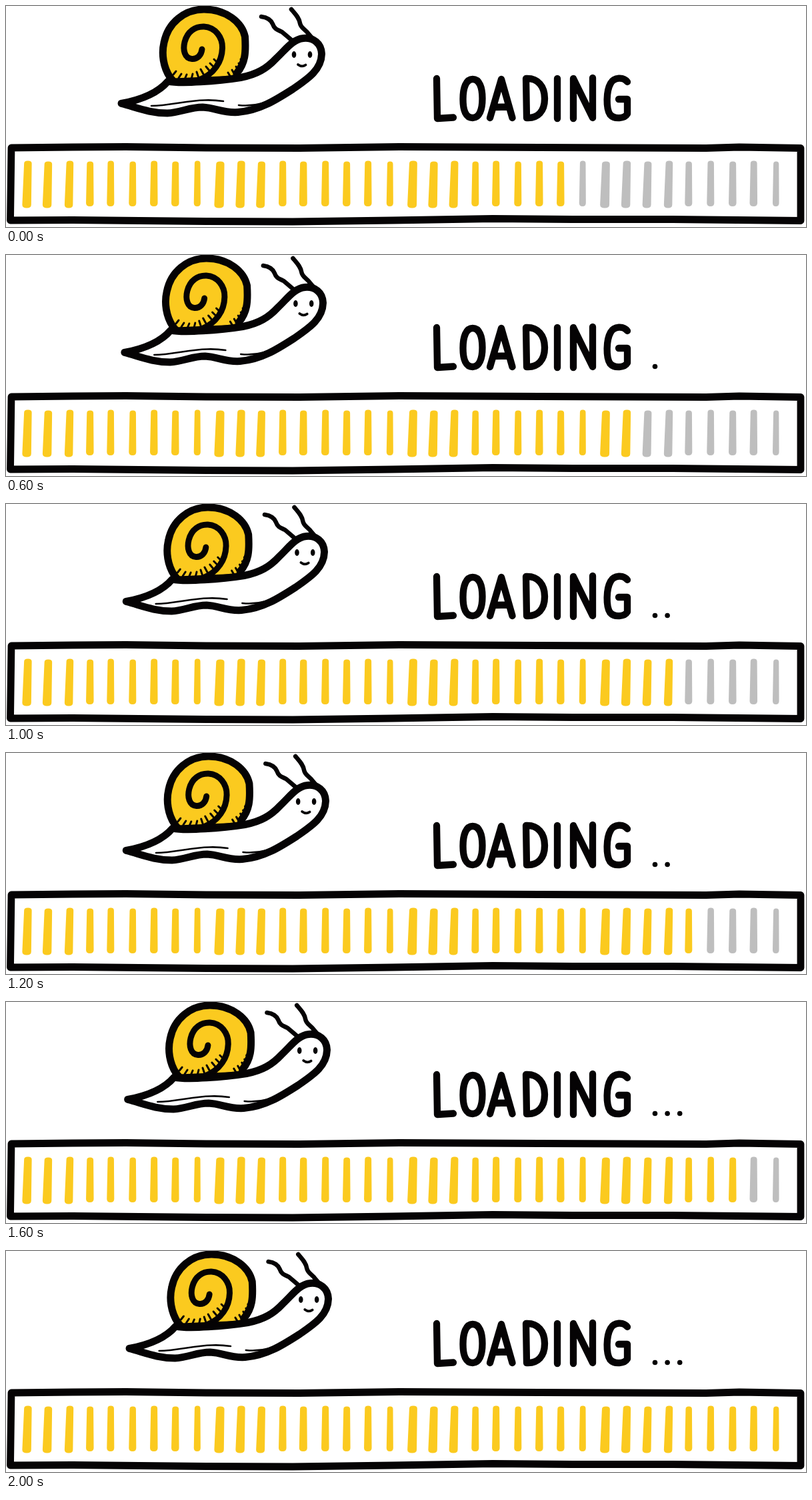
An HTML page with a canvas that plays this animation: 1200 px wide and 332 px high, repeating every 2200 ms.

```html
<!DOCTYPE html>
<html lang="en">
<head>
<meta charset="utf-8">
<title>Loading</title>
<style>
html, body { margin: 0; width: 100%; height: 100%; overflow: hidden; background: #fff; }
canvas { display: block; width: 1200px; height: 332px; }
</style>
</head>
<body>
<canvas id="stage" width="1200" height="332" role="img" aria-label="Loading"></canvas>
<script>
const ctx = document.getElementById('stage').getContext('2d');
const INK = '#050304', YELLOW = '#fbca1f', GREY = '#bebebe';
const STEP = 200, STEPS = 11;
const TAIL = 167, HEAD = 478;

const barX = [32, 62.5, 95, 126, 157, 190, 222, 254, 287, 320.5, 352, 382.5,
  415, 446, 479, 511, 543, 576, 610, 641, 672, 704, 735, 768,
  800, 832, 865, 899, 930.5, 962, 994, 1024, 1057, 1090, 1121.5, 1155];
const barW = [14, 14, 13, 12, 11.5, 11.5, 12, 12, 10.5, 15, 14, 13.5,
  12, 12.5, 12, 12, 12, 10.5, 14.5, 14, 13.5, 11.5, 12, 11.5,
  12, 12, 10.5, 14.5, 14, 13.5, 13, 11.5, 11.5, 12, 12, 10];

const shell = new Path2D('M246 107C236 92 233 72 237 55C243 25 268 5 297 5C331 5 354 25 358.5 46' +
  'C360 70 359 86 346 101L346 110L252 114Z');
const body = new Path2D('M173 146.5C197 142 226 133 243 113C262 117 318 113 352 107.5' +
  'C376 103 391 94 405 79C420 65 430 50 446 48.5C461 47 473 56 473.5 72' +
  'C473 95 455 108 430 125C405 141 380 157 348 159.5C325 161 315 153 295 152' +
  'C275 152 262 160 242 161C215 161 195 152 173 146.5Z');
const spiral = new Path2D('M294 65C293 74 287 80 279 79.5C268 79 265 66 268 54' +
  'C272 38 284 30.5 297 31C314 32 325 47 324.5 63C324 84 312 102 290 111');
const hatch = new Path2D('M251 103L255 98M259 108L263 102M268 110L271 103M278 110L280 102' +
  'M289 108L286 99M297 104L292 95M305 97L300 91M311 91L306 86M316 84L312 80' +
  'M336 105L333 100M343 103L339 96M349 98L345 91M354 91L349 86M357 84L352 80');
const folds = new Path2D('M218 150C245 150 270 142 298 141.5Q312 141 326 143' +
  'M349 149Q367 151 385 146C402 141 412 134 432 123');
const feelers = new Path2D('M383 16C391 17 397 20 400 27C403 36 409 36 414 39Q420 44 427 50' +
  'M428 5C434 12 440 18 441 26C442 33 450 36 453 41L459 48');
const smile = new Path2D('M438 88Q444 92.5 449.5 88.5');
const letters = new Path2D('M646 109L647 169L671 167.5' +
  'M700 110C690 110 685.5 123 685.5 140C685.5 157 690 168 700 168C710 168 714.5 156 714.5 139C714.5 122 710 110 700 110Z' +
  'M726 168L743 110L759.5 168M733 152L754 151.5' +
  'M780 109L781 168C798 169 808 158 808 139C808 121 798 108 780 109Z' +
  'M827 109L827 169M851 169L851 109L880 168L880 108' +
  'M932 114C926 106 912 107 907 116C900 128 900 154 906 163C913 171 928 169 932 162L932 140L919 140');
const frame = new Path2D('M8 213L100 212L180 211.5L300 213L440 213.5L590 211.5L800 212.5L1050 213.5' +
  'L1100 212L1192 213.5L1192 322.5L1000 320.5L850 320.5L730 319.5L580 322L430 324L300 323.5L100 321.5L6.5 322Z');

ctx.lineCap = ctx.lineJoin = 'round';

function line(path, width) {
  ctx.strokeStyle = INK;
  ctx.lineWidth = width;
  ctx.stroke(path);
}

function fill(path, color) {
  ctx.fillStyle = color;
  ctx.fill(path);
}

function oval(x, y, rx, ry) {
  ctx.fillStyle = INK;
  ctx.beginPath();
  ctx.ellipse(x, y, rx, ry, 0, 0, Math.PI * 2);
  ctx.fill();
}

function bar(k, color) {
  const x = barX[k], w = barW[k], wide = w > 12.5, lean = wide ? 0.9 : 0.2;
  const top = 232.5 + k % 2, bottom = wide ? 303.5 : 301;
  const a = w * 0.41, b = w * 0.48, t = x + lean, u = x - lean;
  ctx.fillStyle = color;
  ctx.beginPath();
  ctx.moveTo(t - a, top + 4);
  ctx.quadraticCurveTo(t - a, top, t, top);
  ctx.quadraticCurveTo(t + a, top, t + a, top + 4);
  ctx.lineTo(u + b, bottom - 5);
  ctx.quadraticCurveTo(u + b, bottom, u, bottom);
  ctx.quadraticCurveTo(u - b, bottom, u - b, bottom - 5);
  ctx.fill();
}

// Tail and head advance in turn, so the body stretches and shrinks.
function snail(n) {
  const tail = 2.4 * Math.ceil(n / 2), head = 2 * Math.floor(n / 2);
  const s = 1 + (head - tail) / (HEAD - TAIL);
  ctx.save();
  ctx.translate(TAIL + tail, 0);
  ctx.scale(s, 1);
  ctx.translate(-TAIL, 0);
  fill(shell, YELLOW);
  line(shell, 11);
  line(spiral, 9);
  line(hatch, 3);
  line(feelers, 6.6);
  fill(body, '#fff');
  line(body, 11);
  line(folds, 2.6);
  oval(432, 73, 3.3, 5);
  oval(456, 73, 3.3, 5);
  line(smile, 3.8);
  ctx.restore();
}

function draw(now) {
  const n = Math.floor(now / STEP) % STEPS;
  ctx.fillStyle = '#fff';
  ctx.fillRect(0, 0, 1200, 332);
  snail(n);
  line(letters, 10.3);
  const dots = Math.min(3, Math.ceil(n / 3));
  for (let d = 0; d < dots; d++) oval(973.5 + d * 18.6, 167.5, 3.8, 3.8);
  line(frame, 10.8);
  for (let k = 0; k < barX.length; k++) bar(k, k < 26 + n ? YELLOW : GREY);
}

const start = performance.now();
function tick() {
  draw(performance.now() - start);
  requestAnimationFrame(tick);
}
tick();
</script>
</body>
</html>
```
